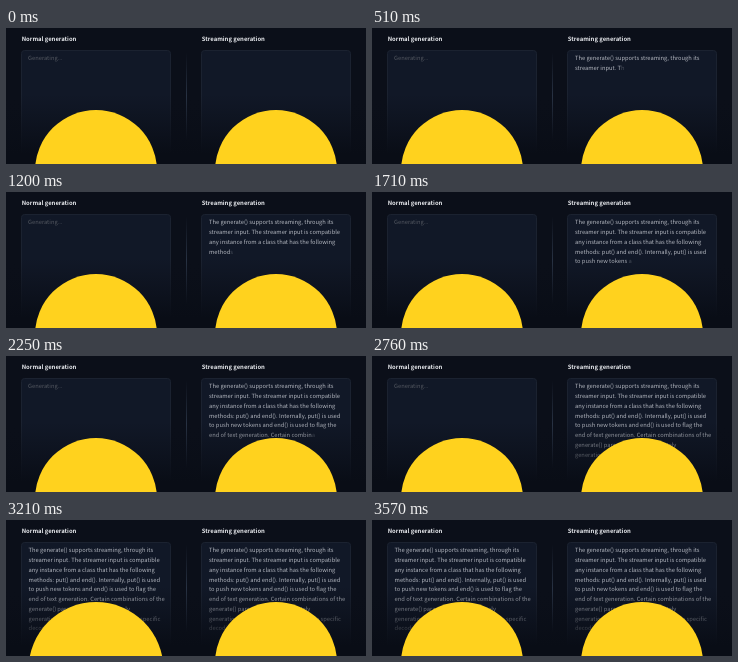
An HTML page that plays this animation: 360 px wide and 136 px high, repeating every 3600 ms.

```html
<!DOCTYPE html>
<html lang="en">
<head>
<meta charset="utf-8">
<title>Normal and streaming generation</title>
<style>
  html, body { margin: 0; width: 100%; height: 100%; overflow: hidden; background: #0b0f19; }
  svg { display: block; width: 360px; height: 136px; }
  text {
    font: 5.78px "Noto Sans CJK JP", "Noto Sans CJK SC", "Open Sans", sans-serif;
    text-rendering: geometricPrecision;
    fill: #b4b8c0;
    white-space: pre;
  }
  .title { font-size: 5.92px; font-weight: 700; fill: #eceef2; }
  .waiting { fill: #545861; }
  .panel { fill: #111827; stroke: #1b2230; }
  .face { fill: #ffd21e; }
</style>
</head>
<body>
<svg viewBox="0 0 360 136">
  <defs>
    <linearGradient id="fade" x2="0" y2="1">
      <stop offset="0" stop-color="#0b0f19" stop-opacity="0"/>
      <stop offset=".85" stop-color="#090d16"/>
      <stop offset="1" stop-color="#090d16"/>
    </linearGradient>
    <linearGradient id="rule" x2="0" y2="1">
      <stop offset="0" stop-color="#283243" stop-opacity="0"/>
      <stop offset=".5" stop-color="#283243"/>
      <stop offset="1" stop-color="#283243" stop-opacity="0"/>
    </linearGradient>
  </defs>

  <rect class="panel" x="15.5" y="22.5" width="149" height="130" rx="3"/>
  <rect class="panel" x="195.5" y="22.5" width="149" height="130" rx="3"/>
  <text class="title" x="15.7" y="12.5">Normal generation</text>
  <text class="title" x="195.8" y="12.5">Streaming generation</text>

  <text class="waiting" id="waiting" x="22" y="32.4">Generating...</text>
  <g id="normal"></g>
  <g id="streaming"></g>

  <rect y="66" width="360" height="70" fill="url(#fade)"/>
  <rect x="180" y="24" width="1" height="88" fill="url(#rule)"/>
  <circle class="face" id="normalFace" cx="90"/>
  <circle class="face" cx="270" cy="143" r="61"/>
</svg>

<script>
const LOOP = 3600;
const CHARS_PER_MS = 0.1265;
const NORMAL_READY = 3200;
const SURPRISE_END = 3480;
const FACE_TOP = 82;
const LINES = [
  'The generate() supports streaming, through its',
  'streamer input. The streamer input is compatible',
  'any instance from a class that has the following',
  'methods: put() and end(). Internally, put() is used',
  'to push new tokens and end() is used to flag the',
  'end of text generation. Certain combinations of the',
  'generate() parameters, and ultimately',
  'generation_config, can be used to enable specific',
  'decoding strategies.'
];

const byId = id => document.getElementById(id);
const svgNode = name => document.createElementNS('http://www.w3.org/2000/svg', name);

function addLines(group, x) {
  return LINES.map((line, i) => {
    const text = svgNode('text');
    const typed = svgNode('tspan');
    const incoming = svgNode('tspan');
    text.setAttribute('x', x);
    text.setAttribute('y', 32.4 + i * 9.75);
    incoming.setAttribute('fill-opacity', 0.35);
    typed.textContent = line;
    text.append(typed, incoming);
    group.append(text);
    return { line, typed, incoming };
  });
}

addLines(byId('normal'), 22.6);
const stream = addLines(byId('streaming'), 203);

function draw(t) {
  let count = Math.floor(t * CHARS_PER_MS);
  for (const { line, typed, incoming } of stream) {
    const n = Math.max(0, count);
    typed.textContent = line.slice(0, n);
    // The next character arrives faintly before it settles.
    incoming.textContent = count > 0 ? line.slice(n, n + 1) : '';
    count -= line.length + 1;
  }

  const ready = t >= NORMAL_READY;
  byId('waiting').style.display = ready ? 'none' : '';
  byId('normal').style.display = ready ? '' : 'none';

  // The left face swells while it reacts to the finished text.
  const radius = ready && t < SURPRISE_END ? 67.5 : 61;
  byId('normalFace').setAttribute('r', radius);
  byId('normalFace').setAttribute('cy', FACE_TOP + radius);
}

const start = performance.now();
function tick() {
  draw((performance.now() - start) % LOOP);
  requestAnimationFrame(tick);
}
tick();
</script>
</body>
</html>
```
